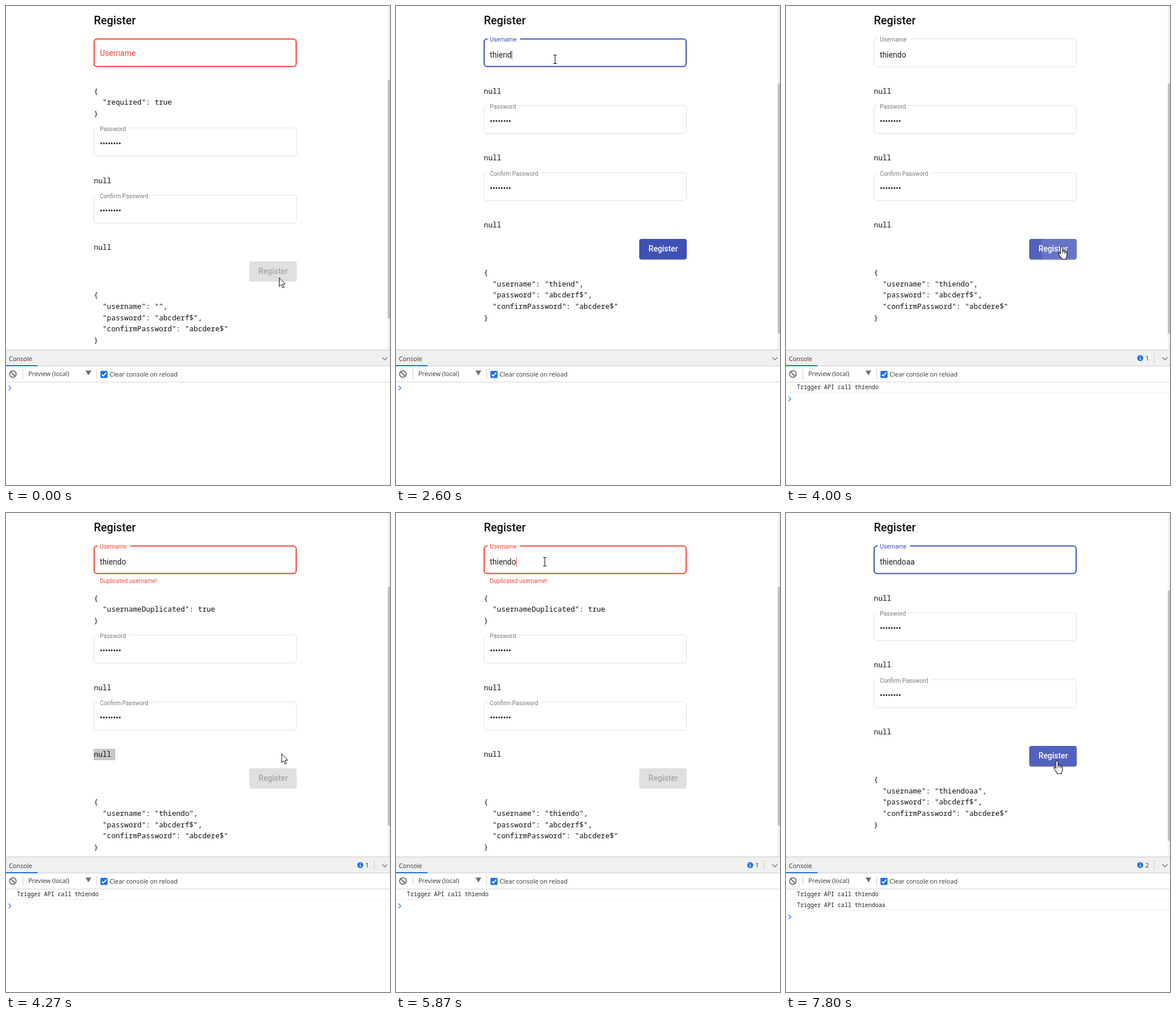
Animation of 671 by 835 pixels, one loop 8 s. Source, as an HTML page:

```html
<!DOCTYPE html>
<html lang="en">
<head>
<meta charset="utf-8">
<title>Register form</title>
<style>
html, body { margin: 0; width: 100%; height: 100%; overflow: hidden; background: #fff; }
svg { display: block; }
text { white-space: pre; font-family: Roboto, sans-serif; font-size: 13.78px; fill: #212121; }
.title { font-size: 19.7px; font-weight: 500; fill: #111; }
.small { font-size: 10.3px; }
.btn { font-weight: 500; }
.pre { font-family: "Noto Sans Mono", monospace; font-size: 12.63px; fill: #111; }
.ui { font-family: "Open Sans", sans-serif; font-size: 10.83px; fill: #333; }
.log { font-family: "Noto Sans Mono", monospace; font-size: 9.92px; fill: #222; }
</style>
</head>
<body>
<svg id="stage" width="671" height="835" viewBox="0 0 671 835"></svg>
<script>
const LOOP = 8000, LINE = 19.66;
const RED = '#f44336', BLUE = '#3f51b5', GRAY = '#7a7a7a', EDGE = '#e0e0e0';
const NAME = 'thiendoaa';
const stage = document.getElementById('stage');

const KEYS = [1870, 1930, 2000, 2200, 2330, 2600, 2800, 7070, 7200];
const CALLS = [[3070, 7], [7530, 9]];
const CARET = [[870, 1670], [1870, 3270], [5870, 6470], [6930, 7500]];
const FOCUS = 660, BLUR = 3870, CLICK = 3930, TAKEN = 4070, REFOCUS = 5870;
// pointer stops: time, x, y
const PATH = [
  [70, 477, 473], [800, 278, 93], [3220, 278, 93], [3400, 485, 367],
  [3600, 484, 398], [3870, 481.5, 419], [4260, 481.5, 419], [4900, 237, 717],
  [4970, 237, 717], [5240, 24, 661], [5450, 130, 662], [5620, 288, 330],
  [5800, 260, 85], [7330, 260, 85], [7800, 473.5, 432]
];

const clamp = v => Math.max(0, Math.min(1, v));
const smooth = v => v * v * (3 - 2 * v);
const easeOut = v => 1 - (1 - clamp(v)) ** 3;
const mix = (a, b, k) => a + (b - a) * k;

const rect = (x, y, w, h, fill, more = '') =>
  `<rect x="${x}" y="${y}" width="${w}" height="${h}" fill="${fill}" ${more}/>`;
const path = (d, stroke, width = 1, fill = 'none') =>
  `<path d="${d}" stroke="${stroke}" stroke-width="${width}" fill="${fill}"/>`;
const text = (x, y, cls, s, fill) =>
  `<text x="${x}" y="${y}" class="${cls}"${fill ? ` style="fill:${fill}"` : ''}>${s}</text>`;
const lines = (y, list) => list.map((s, i) => text(153.6, y + i * LINE, 'pre', s)).join('');
const json = v => JSON.stringify(v, null, 2).split('\n');

const pen = document.createElement('canvas').getContext('2d');
function widthOf(s) {
  pen.font = '13.78px Roboto, sans-serif';
  return pen.measureText(s).width;
}

// Rounded box whose top edge leaves room for the label up to gapEnd
function outline(top, color, thick, gapEnd) {
  const i = thick / 2, l = 153 + i, r = 508 - i, t = top + i, b = top + 50 - i, q = 5;
  return path(`M${gapEnd} ${t}H${r - q}a${q} ${q} 0 0 1 ${q} ${q}V${b - q}a${q} ${q} 0 0 1 ${-q} ${q}` +
    `H${l + q}a${q} ${q} 0 0 1 ${-q} ${-q}V${t + q}a${q} ${q} 0 0 1 ${q} ${-q}H160`, color, thick);
}

function errorsOf(name, t) {
  if (!name) return { required: true };
  if (name.length < 6) return {
    minlength: { requiredLength: 6, actualLength: name.length },
    pattern: { requiredPattern: '/^[a-z]{6,32}$/i', actualValue: name }
  };
  return name.length === 7 && t >= TAKEN ? { usernameDuplicated: true } : null;
}

function pointerAt(t) {
  const n = PATH.findIndex(p => p[0] > t);
  if (n === 0) return PATH[0].slice(1);
  if (n < 0) return PATH[PATH.length - 1].slice(1);
  const a = PATH[n - 1], b = PATH[n], k = smooth((t - a[0]) / (b[0] - a[0]));
  return [mix(a[1], b[1], k), mix(a[2], b[2], k)];
}

function userField(t, name, errors) {
  const focused = (t >= FOCUS && t < BLUR) || t >= REFOCUS;
  const up = easeOut((t - FOCUS) / 340);
  const color = errors ? RED : focused ? BLUE : GRAY;
  const thick = errors || focused ? 2 : 1;
  const gap = up ? mix(160, 217, up) : 160;
  let s = outline(56.5, thick === 2 ? color : EDGE, thick, gap);
  s += `<g transform="translate(164 ${mix(87, 62, up)}) scale(${mix(1, 0.7475, up)})">` +
    text(0, 0, '', 'Username', color) + '</g>';
  if (name) s += text(164, 90, '', name);
  else s += `<g opacity="${clamp((t - FOCUS) / 200)}">${text(164, 90, '', 'Username', '#a6a6a6')}</g>`;
  if (CARET.some(([a, b]) => t >= a && t < b))
    s += rect(Math.round(163.7 + widthOf(name)), 78, 1, 15, errors ? RED : BLUE);
  if (errors && errors.usernameDuplicated) {
    const k = easeOut((t - TAKEN) / 300);
    s += `<g opacity="${k}">${text(164, 122 - 5 * (1 - k), 'small', 'Duplicated username!', RED)}</g>`;
  }
  return s;
}

function secretField(top, label, gapEnd) {
  return outline(top, EDGE, 1, gapEnd) + text(164, top + 6, 'small', label, GRAY) +
    text(164, top + 32.7, '', '••••••••');
}

function button(t, y, enabled, hover) {
  if (!enabled) return rect(425, y, 83, 35.5, '#e0e0e0', 'rx="4"') +
    text(441.3, y + 21.7, 'btn', 'Register', '#a6a6a6');
  let s = rect(425.5, y + 2, 82, 35, '#000', 'rx="4" opacity=".16"') +
    rect(425, y + 1, 83, 35.5, '#000', 'rx="4" opacity=".18"') +
    rect(425, y, 83, 35.5, hover ? '#5261bd' : BLUE, 'rx="4"');
  if (t >= CLICK && t < TAKEN) {
    const r = 62 * easeOut((t - CLICK) / 270);
    s += `<clipPath id="face">${rect(425, y, 83, 35.5, '#000', 'rx="4"')}</clipPath>` +
      `<circle cx="481.5" cy="${y + 15}" r="${r}" fill="#fff" opacity=".13" clip-path="url(#face)"/>`;
  }
  return s + text(441.3, y + 21.7, 'btn', 'Register', '#fff');
}

function scrollbar(rows) {
  const h = 799 + rows * LINE;
  return rect(667, 0, 4, 599, '#f1f1f1') + rect(667, 110650 / h, 4, 357000 / h, '#c1c1c1');
}

function consolePane(t) {
  const calls = CALLS.filter(c => t >= c[0]);
  let s = rect(0, 599, 671, 236, '#fff') + rect(0, 599, 671, 29, '#f0f0f0') +
    rect(0, 599, 671, 1, '#cacaca') + rect(0, 627, 671, 1, '#cccccc') + rect(0, 626, 55, 2, '#1a73e8') +
    text(5, 618.7, 'ui', 'Console') + path('M657.5 612.5l4.5 4.5 4.5-4.5', '#6e6e6e', 1.2);
  if (calls.length) {
    s += '<circle cx="619" cy="613.8" r="5.2" fill="#1a73e8"/>' +
      rect(618.3, 610.5, 1.5, 1.5, '#fff') + rect(618.3, 613, 1.5, 4, '#fff') +
      text(628, 617.8, 'ui', calls.length) + rect(643, 605, 1, 17, '#cccccc');
  }
  s += '<circle cx="12" cy="641.5" r="5.7" fill="none" stroke="#6e6e6e" stroke-width="1.8"/>' +
    path('M8 637.5l8 8', '#6e6e6e', 1.8) + rect(29, 633, 1, 17, '#cccccc') +
    text(39, 645.4, 'ui', 'Preview (local)') + path('M139 635.5h10l-5 8.5z', 'none', 0, '#6e6e6e') +
    rect(158, 633, 1, 17, '#cccccc') + rect(165, 636, 12.5, 12.5, '#1a73e8', 'rx="2"') +
    path('M167.5 642.3l2.6 2.7 5-5.8', '#fff', 1.8) +
    text(181, 646.4, 'ui', 'Clear console on reload') + rect(0, 655, 671, 1, '#d4d4d4');
  calls.forEach(([, n], i) => {
    s += text(19, 667.8 + i * 19, 'log', 'Trigger API call ' + NAME.slice(0, n)) +
      rect(0, 673 + i * 19, 671, 1, '#f0f0f0');
  });
  return s + path(`M4.5 ${662 + calls.length * 19}l4 4-4 4`, '#367cf1', 1.3);
}

function pointer(x, y, kind) {
  const shape = {
    arrow: path('M.5 .5V16L4 12.7 6.5 18.4 8.8 17.4 6.4 11.8H11Z', '#111', 1, '#fff'),
    beam: path('M-3 -7.5H-1Q0 -7.5 0 -6.5Q0 -7.5 1 -7.5H3M0 -6.5V6.5M-3 7.5H-1Q0 7.5 0 6.5Q0 7.5 1 7.5H3', '#111', 1.1),
    hand: path('M-1.8 13V1.8A1.8 1.8 0 0 1 1.8 1.8V8.5Q3.4 6.4 5 8.6Q6.6 7 7.4 9.4Q9.5 8.6 9.5 11.5V15' +
      'Q9.5 18 8 20V22.3H0V20.4Q-2.6 18 -4 15.5Q-5.4 12.8 -5.4 11.6Q-4.2 10 -1.8 13Z', '#111', 1.1, '#fff') +
      path('M1.8 8.5V12.5M5 9V12.5M7.5 9.6V12.5', '#111', 0.9)
  };
  return `<g transform="translate(${x.toFixed(1)} ${y.toFixed(1)})">${shape[kind]}</g>`;
}

function render(t) {
  const name = NAME.slice(0, KEYS.filter(k => t >= k).length);
  const errors = errorsOf(name, t);
  const rows = json(errors);
  const d = (rows.length - 3) * LINE, px = Math.round(d);
  const [x, y] = pointerAt(t);
  const inBox = (top, h, left = 153) => x >= left && x <= 508 && y >= top && y <= top + h;
  const tops = [56.5, 212 + px, 329 + px], btnY = 445 + px;
  const hover = !errors && inBox(btnY, 36, 425);
  const kind = hover ? 'hand' : tops.some(v => inBox(v, 50)) ? 'beam' : 'arrow';
  const picked = t >= 4130 && t < REFOCUS;

  let s = rect(0, 0, 671, 835, '#fff') + text(153.5, 31.7, 'title', 'Register') +
    userField(t, name, errors) + lines(152.6, rows) +
    secretField(tops[1], 'Password', 215) + lines(308.8 + d, ['null']) +
    secretField(tops[2], 'Confirm Password', 254.5);
  if (picked) s += rect(153, 411, 38, 20, '#c8c8c8');
  s += lines(425.2 + d, ['null']) + button(t, btnY, !errors, hover) +
    lines(508.4 + d, json({ username: name, password: 'abcderf$', confirmPassword: 'abcdere$' }));
  if (picked && t >= 4330)
    s += rect(467.5, 385.5, 25, 25, '#f5f5f5', 'rx="3" stroke="#dadada"') + rect(472, 390, 16, 16, '#4a87ee');
  stage.innerHTML = s + scrollbar(rows.length) + consolePane(t) + pointer(x, y, kind);
}

let start;
function tick(now) {
  if (start === undefined) start = now;
  render((now - start) % LOOP);
  requestAnimationFrame(tick);
}
render(0);
requestAnimationFrame(tick);
</script>
</body>
</html>
```
